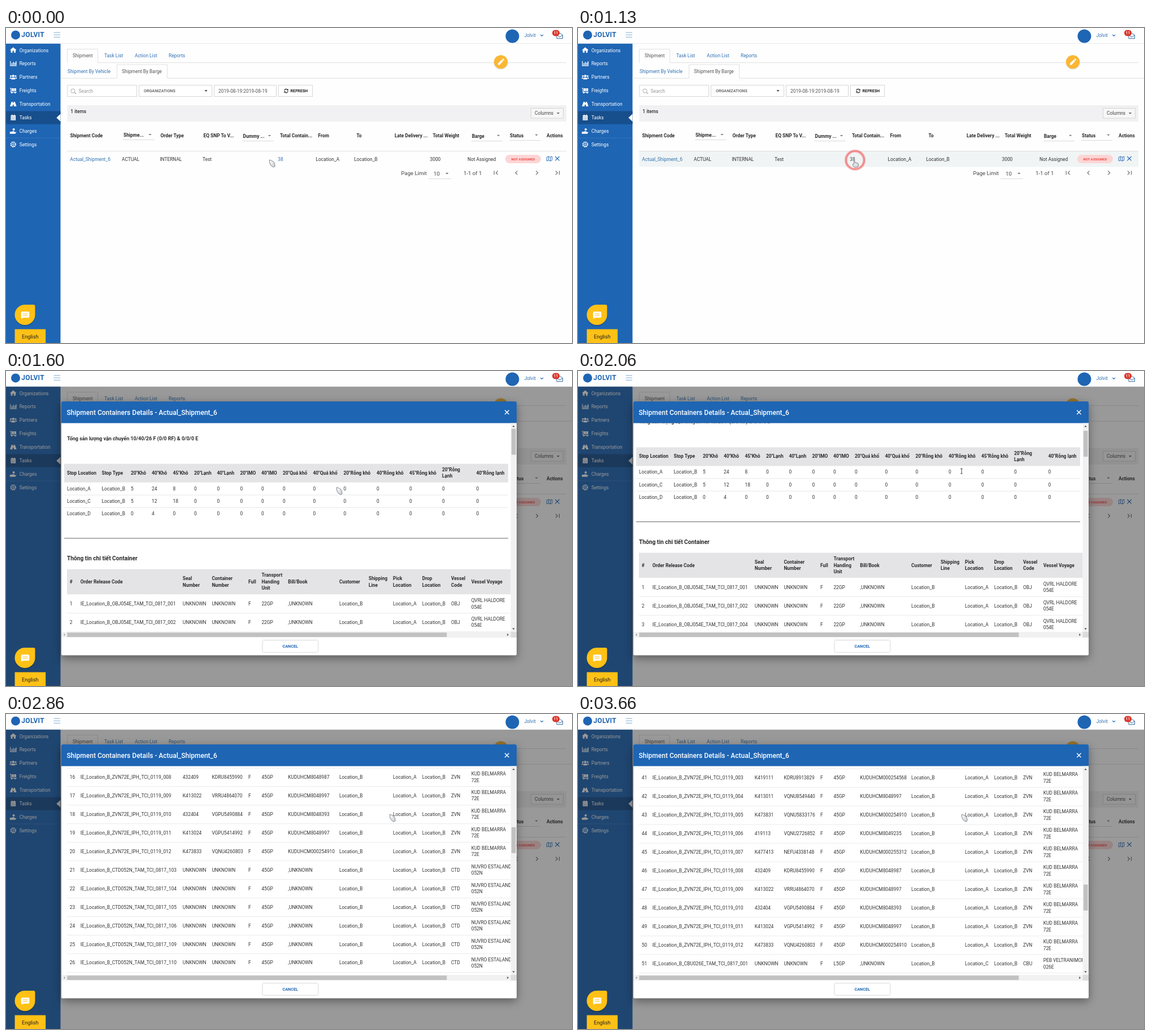
Write an HTML page that moves like this. It is 1002x559 px and loops after 5.06 s.

```html
<!DOCTYPE html>
<html lang="en">
<head>
<meta charset="utf-8">
<title>Shipment containers</title>
<style>
html, body { margin: 0; width: 100%; height: 100%; overflow: hidden; background: #fefefe; }
svg { display: block; width: 100%; height: 100%; font-family: Roboto, "Noto Sans", sans-serif; }
text { white-space: pre; }
</style>
</head>
<body>
<svg id="stage" viewBox="0 0 1002 559" xmlns="http://www.w3.org/2000/svg"></svg>
<script>
const BLUE = '#1e65b4', LINK = '#3272b2', INK = '#333', AMBER = '#ffc115';

// y is the middle of the capitals
const text = (x, y, str, o = {}) => {
  const { size = 8.4, fill = INK, weight = 400, anchor = 'start', extra = '' } = o;
  const safe = String(str).replace(/&/g, '&amp;').replace(/</g, '&lt;');
  return `<text x="${x}" y="${(y + size * 0.355).toFixed(2)}" font-size="${size}" fill="${fill}" ` +
    `font-weight="${weight}" text-anchor="${anchor}" ${extra}>${safe}</text>`;
};
const bold = (x, y, str, o = {}) => text(x, y, str, { weight: 700, fill: '#2b2b2b', ...o });
const lines = (x, y, str, draw = text) => {
  const parts = str.split('|');
  return parts.map((p, i) => draw(x, y + (i - (parts.length - 1) / 2) * 11.5, p)).join('');
};
const rect = (x, y, w, h, fill, extra = '') =>
  `<rect x="${x}" y="${y}" width="${w}" height="${h}" fill="${fill}" ${extra}/>`;
const box = (x, y, w, h, color = '#ccc') => rect(x, y, w, h, '#fff', `stroke="${color}" stroke-width=".8"`);
const circle = (x, y, r, fill, extra = '') => `<circle cx="${x}" cy="${y}" r="${r}" fill="${fill}" ${extra}/>`;
const stroke = (d, color, w = 1, extra = '') =>
  `<path d="${d}" fill="none" stroke="${color}" stroke-width="${w}" ${extra}/>`;
const shape = (d, fill, extra = '') => `<path d="${d}" fill="${fill}" ${extra}/>`;
const at = (x, y, body) => `<g transform="translate(${x} ${y})">${body}</g>`;
const caret = (x, y, fill = '#555', r = 2.6) =>
  shape(`M${x - r} ${y - r / 2}h${2 * r}l${-r} ${r}z`, fill);
const cross = (x, y, r, color, w) =>
  stroke(`M${x - r} ${y - r}l${2 * r} ${2 * r}M${x + r} ${y - r}l${-2 * r} ${2 * r}`, color, w);

function sidebar() {
  const w = '#fff';
  const items = [
    ['Organizations', shape('M-6 0L0-5 6 0H4.2V4.5H1.2V1H-1.2V4.5H-4.2V0z', w)],
    ['Reports', stroke('M-5-4.5V3.7H6', w, 1.2) + stroke('M-2.3 2.5V-1M.3 2.5V-3M2.8 2.5V-1.6M5 2.5V-4', w, 1.5)],
    ['Partners', circle(0, -2, 2.2, w) + circle(-4.2, -1.8, 1.5, w) + circle(4.2, -1.8, 1.5, w) +
      shape('M-3.5 4.2V2.5Q-3.5 1-2 1H2Q3.5 1 3.5 2.5V4.2zM-6.2 3V1.5Q-6 .3-4 .3V3zM6.2 3V1.5Q6 .3 4 .3V3z', w)],
    ['Freights', stroke('M-6-4H-4V2.8H6', w, 1.2) + rect(-2.6, -4, 3.6, 5, w) + rect(1.6, -4, 3.6, 5, w) +
      circle(-2.5, 4, 1.2, w) + circle(3.5, 4, 1.2, w)],
    ['Transportation', shape('M-3-4H-.6L-.8-1.6H.8L.6-4H3L5.8 4.2H1.2L1 1H-1L-1.2 4.2H-5.8z', w)],
    ['Tasks', shape('M-4.3-3.8H-2.6V-5.2H-1.3V-3.8H1.3V-5.2H2.6V-3.8H4.3V5H-4.3z', w) +
      stroke('M-3.5-1.3H3.5M-3 1.2H3M-3 3.2H3', '#174e8c', .8, 'stroke-dasharray="1.4 .8"')],
    ['Charges', circle(.8, -2.8, 2, w) + shape('M-6 1.2H-3L-1 .6H2L2.4 2H5.8L3.5 5H-6z', w)],
    ['Settings', circle(0, 0, 3.8, 'none', `stroke="${w}" stroke-width="1.1"`) +
      circle(0, 0, 1.6, 'none', `stroke="${w}" stroke-width="1"`) +
      circle(0, 0, 4.7, 'none', `stroke="${w}" stroke-width="1.2" stroke-dasharray="1.8 1.9"`)],
  ];
  return rect(0, 27.5, 96.5, 531.5, BLUE) + rect(0, 147.5, 96.5, 23.2, '#174e8c') +
    shape('M96.5 152.5V166L89.3 159.2z', '#fefefe') + rect(0, 194.7, 96.5, .8, '#3d7cc2') +
    items.map(([name, icon], i) => {
      const y = 39.6 + i * 23.9;
      return at(12.8, y - .3, icon) + text(23.7, y, name, { fill: w });
    }).join('');
}

function tabs() {
  const grey = '#d9d9d9';
  return stroke('M108.5 61.5V37.5H162.5V61.5H992', grey, .8) + stroke('M99 89.2H196.5V65H285.5V89.2H1002', grey, .8) +
    text(118, 49.3, 'Shipment', { fill: '#555' }) + text(174, 49.3, 'Task List', { fill: LINK }) +
    text(228, 49.3, 'Action List', { fill: LINK }) + text(288, 49.3, 'Reports', { fill: LINK }) +
    text(109, 77, 'Shipment By Vehicle', { fill: LINK }) + text(205.3, 77, 'Shipment By Barge', { fill: '#555' });
}

function filters() {
  const small = { size: 7.2, weight: 500 };
  return box(108.9, 101.6, 122.6, 20) + circle(118.5, 111.6, 3.6, 'none', 'stroke="#aaa" stroke-width="1"') +
    stroke('M121.2 114.3L124 117', '#aaa', 1.2) + text(128.5, 111.7, 'Search', { fill: '#999' }) +
    box(235.5, 101.6, 129, 20) + text(244, 111.6, 'ORGANIZATIONS', { ...small, fill: '#555' }) + caret(354, 111.6, '#333') +
    box(368.4, 101.6, 110, 20) + text(376, 111.7, '2019-08-19:2019-08-19', { fill: '#555' }) +
    box(482.3, 101.6, 60.4, 20) + text(503.5, 111.6, 'REFRESH', { ...small, weight: 700, fill: '#222' }) +
    at(496, 111.6, stroke('M-3.2-.6A3.2 3.2 0 0 1 2.6-1.9M3.2 .6A3.2 3.2 0 0 1-2.6 1.9', '#222', 1.2) +
      shape('M3.6-3.6V-.6H.6zM-3.6 3.6V.6H-.6z', '#222')) +
    circle(876, 61, 12.6, '#000', 'opacity=".12"') + circle(876, 60.2, 12, '#fbb733') +
    shape('M871 65.4V62.8L877.6 56.2 880.2 58.8 873.6 65.4zM878.3 55.5L879.3 54.5Q880 54 880.7 54.6L881.8 55.7Q882.4 56.4 881.9 57.1L880.9 58.1z', '#fff');
}

function shipments() {
  const heads = [[113.5, 'Shipment Code'], [273.5, 'Order Type'], [349.5, 'EQ SNP To V...'], [485, 'Total Contain...'],
    [552.5, 'From'], [620.5, 'To'], [688, 'Late Delivery ...'], [755.5, 'Total Weight'], [957, 'Actions']];
  const picks = [[208, 190, 'Shipme...'], [419.5, 192, 'Dummy ...'], [824.7, 191.8, 'Barge'], [892, 190.8, 'Status']];
  const cells = [[205, 'ACTUAL'], [272.3, 'INTERNAL'], [348, 'Test'], [548.5, 'Location_A'],
    [616.3, 'Location_B'], [750.5, '3000'], [817, 'Not Assigned']];
  const dim = '#666', big = { size: 9.6, fill: '#444' };
  return rect(108.5, 137, 883.5, 29, '#f1f1f3') + bold(114.3, 148.5, '1 items', { weight: 500 }) +
    rect(929.4, 142.6, 57, 17.4, '#f7f7f7', 'stroke="#ccc" stroke-width=".8"') +
    text(936, 151.5, 'Columns', { fill: '#444' }) + caret(977.5, 151.5) +
    heads.map(([x, s]) => bold(x, 191.3, s)).join('') +
    picks.map(([x, y, s]) => bold(x, y, s) + caret(x + 47, y - .8, '#777') + rect(x - .8, y + 8.2, 55, .7, '#ccc')).join('') +
    rect(108.5, 218, 883.5, .9, '#ddd') + rect(108.5, 219, 883.5, 27.4, '#f0f4f4', 'id="hover"') +
    text(113.3, 232.8, 'Actual_Shipment_6', { fill: LINK }) +
    text(481.3, 232.8, '38', { fill: LINK, extra: 'id="count"' }) +
    cells.map(([x, s]) => text(x, 232.8, s)).join('') +
    rect(883.8, 225, 63.2, 15, '#fdd5d5', 'rx="7.5"') +
    text(915.4, 232.6, 'NOT ASSIGNED', { size: 6, weight: 700, fill: '#ee4b45', anchor: 'middle' }) +
    stroke('M957.3 229.2L960.4 228 963.6 229.2 966.7 228V234.8L963.6 236 960.4 234.8 957.3 236zM960.4 228V234.8M963.6 229.2V236', BLUE, .9) +
    cross(976, 231.7, 3.7, BLUE, 1.1) +
    text(699.5, 257.6, 'Page Limit', big) + text(757, 258.7, '10', big) + caret(780.7, 258.3, dim) +
    rect(748, 267, 40, .7, '#ccc') + text(810, 257.6, '1-1 of 1', big) +
    stroke('M864.2 253.5V260.5M870.8 253.7L867.5 257 870.8 260.3M905.3 253.7L902 257 905.3 260.3' +
      'M938.3 253.7L941.6 257 938.3 260.3M973 253.7L976.3 257 973 260.3M979.5 253.5V260.5', dim, 1.1);
}

function header() {
  return rect(0, 0, 1002, 27.5, '#fefefe') + rect(96.5, 27, 905.5, .8, '#e6e6e6') +
    circle(17, 12.4, 8, BLUE) + text(27.3, 12.2, 'JOLVIT', { size: 12, weight: 700, fill: BLUE, extra: 'letter-spacing=".3"' }) +
    stroke('M84.5 8H96M84.5 12.1H96M84.5 16.2H96', '#5f93cb', .8) +
    circle(896.4, 14.4, 12, BLUE) + text(917.4, 13, 'Jolvit', { fill: LINK }) +
    stroke('M946.2 11.8L948.6 14.2 951 11.8', BLUE, 1.2) +
    stroke('M975 12.5V18.7H985.5V12.5L980.2 9zM975 12.7L980.2 16 985.5 12.7', '#36699f', 1) +
    shape('M967 9Q967 3.6 973.5 3.6T980 9 973.5 14.4 967 9z', '#d9362b') +
    text(973.4, 9, '11', { size: 7, weight: 500, fill: '#fff', anchor: 'middle' });
}

function helpers() {
  return shape('M33.5 492H48Q51.5 492 51.5 495.5V510A18 18 0 1 1 33.5 492z', '#000', 'opacity=".18" transform="translate(0 1)"') +
    shape('M33.5 491H48.5Q51.5 491 51.5 494V509A18 18 0 1 1 33.5 491z', AMBER) +
    shape('M28.5 503.3H39.5Q41.3 503.3 41.3 505V512.2Q41.3 514 39.5 514H31L27.4 515.8 26.7 512V505Q26.7 503.3 28.5 503.3z', '#fff') +
    stroke('M29.8 507.2H38.2M29.8 510.2H38.2', AMBER, 1.1) +
    rect(15.6, 534.5, 54.6, 24.5, AMBER) + text(42.8, 548.1, 'English', { size: 9.2, fill: '#222', anchor: 'middle' });
}

function totals() {
  const xs = [108, 169.5, 221, 258, 295.5, 333, 373.5, 414.5, 452, 490, 543.5, 597.5, 656, 714, 772, 832.5];
  const heads = ['Stop Location', 'Stop Type', '20"Khô', '40"Khô', '45"Khô', '20"Lạnh', '40"Lạnh', '20"IMO', '40"IMO',
    '20"Quá khổ', '40"Quá khổ', '20"Rỗng khô', '40"Rỗng khô', '45"Rỗng khô', '20"Rỗng|Lạnh', '40"Rỗng lạnh'];
  const rows = [['A', 5, 24, 8], ['C', 5, 12, 18], ['D', 0, 4, 0]];
  return bold(108, 90.3, 'Tổng sản lượng vận chuyển 10/40/26 F (0/0 RF) & 0/0/0 E', { size: 9 }) +
    rect(103, 135.5, 786, 33, '#e4e4e6') + heads.map((s, i) => lines(xs[i], 151.5, s, bold)).join('') +
    rows.map(([place, ...n], r) => {
      const y = 179.5 + r * 22.25;
      const cells = ['Location_' + place, 'Location_B', ...n];
      return xs.map((x, c) => text(x, y, cells[c] ?? 0)).join('') +
        (r < 2 ? rect(103, y + 11, 786, .7, '#dedede') : '');
    }).join('') + rect(103, 267.2, 786, .9, '#555') +
    bold(108, 303.6, 'Thông tin chi tiết Container', { size: 10.2 });
}

function orders() {
  const ships = {
    OBJ: ['OBJ054E_TAM_TCI_0817', '22GP', 'QVRL HALDORE|054E'],
    ZVN: ['ZVN72E_IPH_TCI_0119', '45GP', 'KUD BELMARRA|72E'],
    CTD: ['CTD052N_TAM_TCI_0817', '45GP', 'NUVRO ESTALAND|052N'],
    LDP: ['LDP003W_TAM_TCI_0817', '45GP', 'BRENK SOL TAVIRO|003W'],
    CBU: ['CBU026E_TAM_TCI_0817', 'L5GP', 'PEB VELTRANIMOR|026E'],
  };
  const booked = `K419111 KDRU8913829 000254568,K413011 VQNU8549440 8048997,K473831 VQNU5833176 000254910,
419113 VQNU2726852 8049235,K477413 NEFU4338148 000255312,432409 KDRU8455990 8048987,K413022 VRRU4864070 8048997,
432404 VGPU5490884 8048393,K413024 VGPU5414992 8048997,K473833 VQNU4260803 000254910`.split(',').map(s => s.trim().split(' '));
  const rows = [];
  const add = (ship, place, nums) => nums.split(' ').forEach((n, i) => {
    const [route, unit, voyage] = ships[ship];
    const [seal, id, bill] = ship === 'ZVN' ? booked[i] : ['UNKNOWN', 'UNKNOWN'];
    rows.push([rows.length + 1, `IE_Location_B_${route}_${n.padStart(3, '0')}`, seal, id, 'F', unit,
      bill ? 'KUDUHCM' + bill : ',UNKNOWN', 'Location_B', '', 'Location_' + place, 'Location_B', ship, voyage]);
  });
  const barge = '103 104 105 106 109 110 111 112', booking = '3 4 5 6 7 8 9 10 11 12';
  add('OBJ', 'A', '1 2 4 5 6');
  add('OBJ', 'C', '1 2 4 5 6');
  add('ZVN', 'A', booking);
  for (const place of 'AC') {
    add('CTD', place, barge);
    add('LDP', place, '068 086');
  }
  add('ZVN', 'A', booking);
  add('CBU', 'C', '1 2');

  const xs = [112.7, 131.8, 312.8, 364.4, 429, 452.4, 499.3, 590, 642, 685, 736.7, 788, 823.7];
  const heads = ['#', 'Order Release Code', 'Seal|Number', 'Container|Number', 'Full', 'Transport|Handing|Unit', 'Bill/Book',
    'Customer', 'Shipping|Line', 'Pick|Location', 'Drop|Location', 'Vessel|Code', 'Vessel Voyage'];
  return rect(108, 322.5, 786, 44.6, '#e4e4e6') + heads.map((s, i) => lines(xs[i], 344.6, s, bold)).join('') +
    rows.map((cells, r) => {
      const y = 383.6 + r * 32.97;
      return cells.map((s, c) => lines(xs[c], y, String(s))).join('') + rect(108, y + 16.7, 786, .7, '#e2e2e2');
    }).join('');
}

function dialog() {
  return rect(98, 54, 806, 450.5, '#fff', 'rx="2" style="filter:drop-shadow(0 5px 8px rgba(0,0,0,.4))"') +
    shape('M98 92.5V56Q98 54 100 54H902Q904 54 904 56V92.5z', BLUE) +
    text(107.6, 73.3, 'Shipment Containers Details - Actual_Shipment_6', { size: 12, weight: 500, fill: '#fff' }) +
    cross(886.8, 73.3, 3.7, '#fff', 1.4) +
    `<g clip-path="url(#view)"><g id="list">${totals()}${orders()}</g></g>` +
    rect(893.5, 92.5, 10.5, 370.5, '#f1f1f1') + rect(894.8, 102.5, 7.8, 46, '#c1c1c1', 'id="thumb"') +
    shape('M896.2 99.2H900.8L898.5 96.7zM896.2 456.5H900.8L898.5 459z', '#444') +
    rect(98, 463, 795.5, 10, '#f1f1f1') + rect(108.3, 464.2, 672, 7.8, '#c1c1c1') + rect(893.5, 463, 10.5, 10, '#dcdcdc') +
    shape('M104.3 465.8V470.2L101.9 468z', '#999') + shape('M887.4 465.8V470.2L889.8 468z', '#444') +
    rect(454.5, 478.3, 97.5, 20.5, '#fff', 'rx="1" style="filter:drop-shadow(0 .7px .8px rgba(0,0,0,.35))"') +
    text(503.2, 488.8, 'CANCEL', { size: 7.2, weight: 700, fill: BLUE, anchor: 'middle' });
}

function pointers() {
  const edge = 'stroke="#70757c" stroke-width=".9" stroke-linejoin="round"';
  return `<g id="arrow">${shape('M.3 .3Q5 .8 8.2 4.2 10.4 7 10 11.4 9.4 13.4 6.6 12.8 2.6 10.8 1 6.4 .2 3.4 .3 .3z', 'url(#pearl)', edge)}</g>` +
    `<g id="hand">${shape('M-2.2 5.5V2.2Q-1.6 .8-.6 2.2V4.2L3.8 4.9Q5.8 5.4 5.6 7.4V10Q5.2 12.3 3 12.5H-.8Q-2.8 12.2-3.6 10.4L-4.6 7.6Q-4.6 6-2.2 7z', 'url(#pearl)', edge)}</g>` +
    `<g id="beam">${stroke('M-1.8-4.5H1.8M0-4.5V4M-1.8 4H1.8', '#333', .9)}</g>`;
}

const stage = document.getElementById('stage');
stage.innerHTML = `<defs>
  <clipPath id="view"><rect x="98" y="92.5" width="795.5" height="370.5"/></clipPath>
  <linearGradient id="pearl" x2="1" y2="1"><stop stop-color="#fff"/><stop offset="1" stop-color="#c9cdd2"/></linearGradient>
</defs>` + rect(0, 0, 1002, 559, '#fefefe') + tabs() + filters() + shipments() + sidebar() +
  rect(0, 27.5, 1002, 531.5, '#212121', 'id="shade"') + header() + helpers() +
  `<g id="dialog">${dialog()}</g>` +
  `<g id="ring" fill="none" stroke="#f06464"><circle stroke-width="5.5" opacity=".3"/><circle stroke-width="3" opacity=".62"/></g>` +
  `<g id="pointer">${pointers()}</g>`;

const el = id => document.getElementById(id);
const set = (id, attrs) => { for (const k in attrs) el(id).setAttribute(k, attrs[k]); };
const show = (id, on) => { el(id).style.display = on ? '' : 'none'; };
const clamp = v => Math.max(0, Math.min(1, v));
const mix = (a, b, p) => a + (b - a) * p;
const smooth = p => p * p * (3 - 2 * p);

// Piecewise-linear [tick, value] track
function track(points, k) {
  if (k <= points[0][0]) return points[0][1];
  for (let i = 1; i < points.length; i++) {
    const [a, u] = points[i - 1], [b, v] = points[i];
    if (k <= b) return mix(u, v, (k - a) / (b - a));
  }
  return points[points.length - 1][1];
}
const SCROLL = [[30, 0], [31, 29.2], [33, 115], [38, 419.7], [48, 1171.4], [53, 1562], [54, 1608], [55, 1618.5]];
const LOOP = 5060, TICK = 1000 / 15;

function draw(ms) {
  const k = Math.min(55, Math.floor((ms % LOOP + 7) / TICK));

  const open = 1 - (1 - clamp((k * TICK - 1143) / 260)) ** 3;
  show('dialog', open > 0);
  set('dialog', {
    opacity: Math.min(1, open * 1.05),
    transform: `translate(501 279.3) scale(${mix(.7, 1, open)}) translate(-501 -279.3)`,
  });
  set('shade', { opacity: .46 * Math.min(1, open * 1.15) });
  set('hover', { opacity: open > 0 ? 0 : clamp(k / 4) });
  set('count', { fill: k >= 3 && k < 23 ? '#444' : LINK });

  const scroll = track(SCROLL, k);
  set('list', { transform: `translate(0 ${29.2 - scroll})` });
  set('thumb', { y: 102.5 + scroll * .1237 });

  show('ring', k >= 7 && k < 23);
  set('ring', { transform: 'translate(490.5 234.4)' });
  const r = Math.max(.5, 3 + 1.53 * (k - 7) - 2.2);
  for (const c of el('ring').children) c.setAttribute('r', r);

  const reach = smooth(clamp(k / 4)), leave = smooth(clamp((k - 22) / 4));
  const x = mix(mix(466, 490.8, reach), 679, leave), y = mix(mix(233.8, 234.6, reach), 178, leave);
  set('pointer', { transform: `translate(${x} ${y})` });
  const kind = k >= 3 && k < 23 ? 'hand' : k >= 25 && k < 33 ? 'beam' : 'arrow';
  for (const id of ['arrow', 'hand', 'beam']) show(id, id === kind);
}

const start = performance.now();
function loop() {
  draw(performance.now() - start);
  requestAnimationFrame(loop);
}
loop();
</script>
</body>
</html>
```
